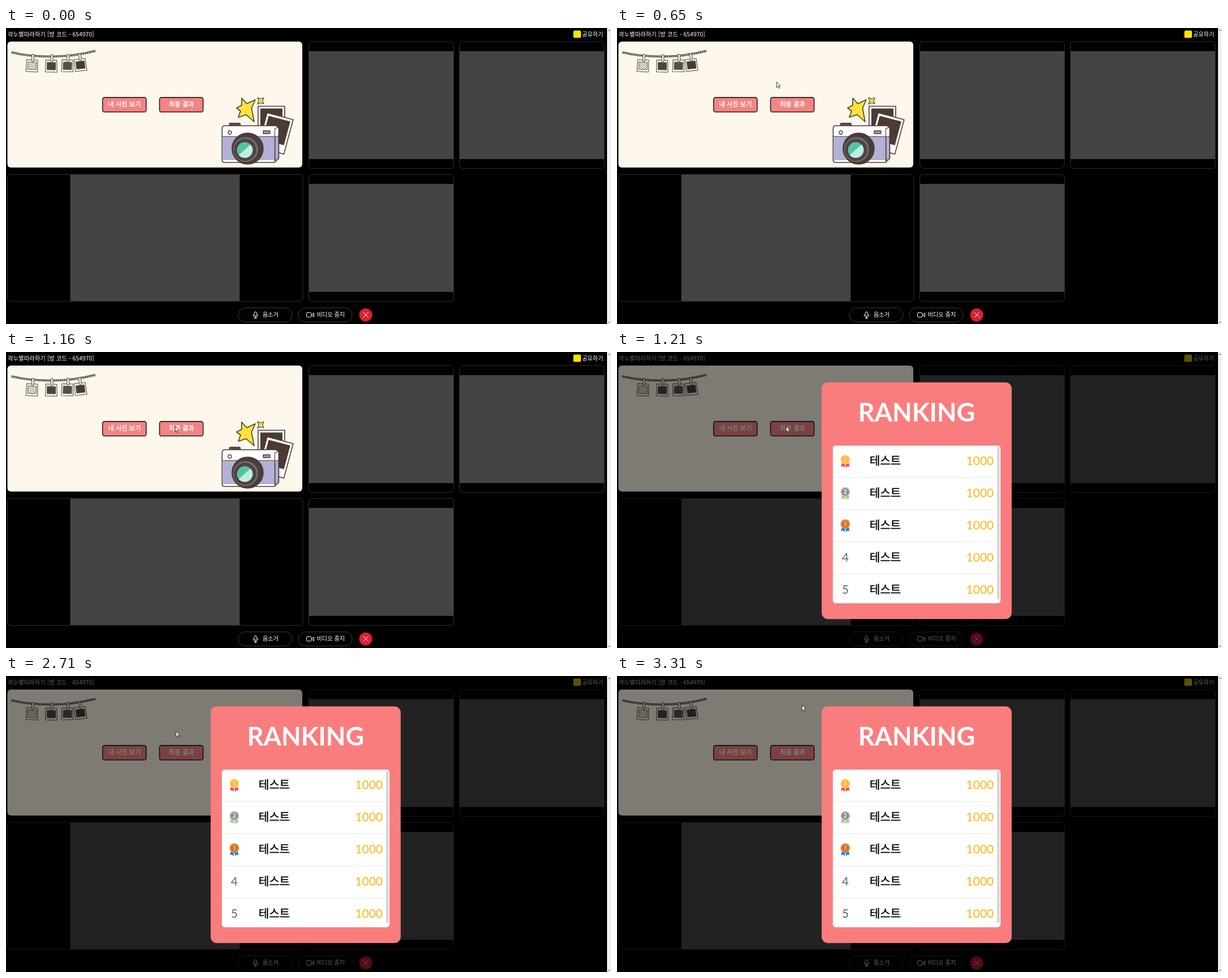
An HTML page for the animation above (3.76 s loop, 1068 by 524 pixels).

```html
<!DOCTYPE html>
<html lang="ko">
<head>
<meta charset="utf-8">
<title>Ranking</title>
<style>
  html, body { margin: 0; width: 100%; height: 100%; overflow: hidden; background: #000; }
  svg { display: block; width: 1068px; height: 524px; }
  text { font-family: "Noto Sans CJK KR", "Noto Sans CJK", "Noto Sans", sans-serif; white-space: pre; }
  .latin { font-family: Lato, sans-serif; }
  .mid { text-anchor: middle; }
  .end { text-anchor: end; }
  .semi { stroke-width: .35; }
  .tile { fill: none; stroke: #303030; }
  .video { fill: #444; }
  .ink { stroke: #4c3a35; stroke-width: 1.6; stroke-linejoin: round; }
  .icon { fill: none; stroke: #fff; stroke-linecap: round; }
</style>
</head>
<body>
<svg viewBox="0 0 1068 524">
  <defs>
    <pattern id="hatch" width="3" height="4" patternUnits="userSpaceOnUse" patternTransform="rotate(48)">
      <path d="M.6 0V4" stroke="#56524a" stroke-width=".8"/>
    </pattern>
    <clipPath id="glass"><circle cx="421.5" cy="216" r="14"/></clipPath>
  </defs>
  <rect width="1068" height="524"/>

  <text x="3" y="14.7" font-size="10.4" fill="#fff">곽누별따라하기 [방 코드 - 654970]</text>
  <rect x="1001.5" y="4.5" width="13.5" height="13" rx="2.5" fill="#fae100"/>
  <text x="1017" y="14.5" font-size="10.1" fill="#fff">공유하기</text>

  <rect x="2.5" y="24" width="520.5" height="223" rx="6" fill="#fdf8eb"/>
  <g id="garland"></g>
  <g id="buttons"></g>

  <g class="ink">
    <path d="M416 124L425 134 440 127 433.5 142 438 166 424 153.5 410 158 414 147 407 141.5 416 137Z" fill="#ffe23a"/>
    <path d="M444 123L449 125.5 455 123.5 453 129 455 134 449 132.5 444 135 446 129Z" fill="#ffe23a" stroke-width="1.1"/>
    <path d="M445 138.5H492V185H445Z" fill="#fff"/>
    <path d="M449 142.5H488V178H449Z" fill="#4c3a35" stroke="none"/>
    <g transform="translate(461 150) rotate(15)">
      <path d="M0 0H47.5V63H0Z" fill="#fff"/>
      <path d="M4 4.5H43.5V48H4Z" fill="#4c3a35" stroke="none"/>
    </g>
    <rect x="394.5" y="168.5" width="19" height="7" rx="2" fill="#5e4c48"/>
    <path d="M386 173H476Q481 174 481.5 179V231L474 238H386Q381.5 238 381.5 233V178Q381.5 173 386 173Z" fill="#fff"/>
    <path d="M382.2 192H474V234H382.2Z" fill="#b3b1d5" stroke="none"/>
    <path d="M475 193L481 191V229L475 235Z" fill="#b3b1d5" stroke-width="1"/>
    <path d="M382 192H474.5M474.5 178V237M474.5 179L480 175" fill="none" stroke-width="1.1"/>
    <circle cx="395" cy="185" r="3" fill="#fff" stroke-width="1.3"/>
    <rect x="454" y="182" width="12" height="5" fill="#a59a9b" stroke-width="1.3"/>
    <circle cx="426.5" cy="213.5" r="27.5" fill="#463e3f"/>
    <circle cx="423" cy="215" r="23" fill="#71686a"/>
    <circle cx="422" cy="215.7" r="18.5" fill="#514849"/>
    <circle cx="421.5" cy="216" r="14.7" fill="#55c1a4"/>
    <path d="M405 230L440 199V235H405Z" fill="#bdeee2" clip-path="url(#glass)" stroke="none"/>
  </g>

  <g id="tiles"></g>

  <g fill="#000" stroke="#3a3a3a">
    <rect x="410" y="495.5" width="95" height="25" rx="12.5"/>
    <rect x="516" y="495.5" width="95" height="25" rx="12.5"/>
  </g>
  <g class="icon">
    <rect x="438.3" y="502.5" width="4.4" height="7.5" rx="2.2"/>
    <path d="M436.3 507.5Q436.3 512 440.5 512T444.7 507.5M440.5 512V514M438.5 514H442.5"/>
    <rect x="530.5" y="503.8" width="8.5" height="8" rx="1.8"/>
    <path d="M541 506.5L543.5 504.5V511.5L541 509.5Z"/>
  </g>
  <text class="mid" x="467" y="511" font-size="10.2" fill="#fff">음소거</text>
  <text class="mid" x="573.3" y="511" font-size="10.2" fill="#fff">비디오 중지</text>
  <circle cx="635" cy="508" r="11.5" fill="#dc1f30"/>
  <path class="icon" d="M631 503.5L639.5 512M639.5 503.5L631 512"/>

  <g id="modal">
    <rect width="1061" height="524" opacity=".5"/>
    <path d="M0 0H1061V22H0ZM0 486H1061V524H0Z" opacity=".25"/>
    <rect x="361.3" y="53.7" width="335.4" height="419" rx="11" fill="#fa7d7d"/>
    <text class="mid latin" x="529" y="123.3" font-size="45" font-weight="700" fill="#fff">RANKING</text>
    <rect x="381" y="165.7" width="296" height="279" rx="5" fill="#fff"/>
    <g id="rows"></g>
    <rect x="671" y="168" width="4.5" height="269.5" rx="2.2" fill="#d5d5d8"/>
  </g>

  <rect x="1061" width="7" height="524" fill="#f1f1f1"/>
  <path d="M1062.8 5L1064.8 2.5 1066.8 5ZM1062.8 520L1064.8 522.5 1066.8 520Z" fill="#777"/>
  <path id="cursor" d="M0 0V9.8L2.3 7.7 3.9 11.2 5.5 10.5 3.9 7.1H6.8Z" fill="#fff" stroke="#111" stroke-width=".8"/>
</svg>
<script>
const LOOP = 3760, MODAL_AT = 1210;
const $ = id => document.getElementById(id);
const fill = (id, items, draw) => { $(id).innerHTML = items.map(draw).join(''); };

const rope = 'M9 43Q42 51 82 50.5T158 40.5';
const photos = [[46, 67, 3, 'url(#hatch)'], [80, 67.5, 1, '#4b4540'], [108.5, 67, 2, '#57504a'], [131.5, 65.5, -6, '#443b36']];
fill('garland', photos, ([x, y, turn, shade]) => `
  <g transform="translate(${x} ${y}) rotate(${turn})" stroke="#48443d" stroke-width="1">
    <path d="M-10 -10.5H9.5L10.3 10.5H-10.3Z" fill="#fdf8eb"/>
    <path d="M-7.5 -6.5H7.5V6.5H-7.5Z" fill="${shade}" stroke-width=".8"/>
  </g>`);
$('garland').insertAdjacentHTML('afterbegin', `
  <path d="${rope}" fill="none" stroke="#4f4b44" stroke-width="3.4"/>
  <path d="${rope}" fill="none" stroke="#e4dfd2" stroke-width="1.4" stroke-dasharray="2 1.7"/>`);
$('garland').insertAdjacentHTML('beforeend', photos.map(([x, y, turn]) =>
  `<rect x="-2" y="-20.5" width="4" height="12.5" rx="1.5" transform="translate(${x + 0.7} ${y}) rotate(${turn})"
    fill="#f1ecdf" stroke="#4f4b44"/>`).join(''));

fill('buttons', [[170.5, '내 사진 보기'], [271, '최종 결과']], ([x, label]) => `
  <rect x="${x}" y="123" width="77" height="25.7" rx="3.5" fill="#f48383" stroke="#000" stroke-width="1.3"/>
  <text class="mid semi" x="${x + 38.6}" y="138.8" font-size="11.2" fill="#fff" stroke="#fff">${label}</text>`);

// tile x, y, width, then the video box inside it
fill('tiles', [
  [534.5, 24, 255.5, 535, 41, 255, 191],
  [800.5, 24, 255.5, 801, 41, 255, 191],
  [2.5, 259.5, 521.5, 113.5, 259.5, 299, 224],
  [534.5, 259.5, 255.5, 535, 276, 255, 191]
], ([x, y, w, vx, vy, vw, vh]) => `
  <rect class="tile" x="${x}" y="${y}" width="${w}" height="224.5" rx="6"/>
  <rect class="video" x="${vx}" y="${vy}" width="${vw}" height="${vh}"/>`);

const medals = [['#fcd377', '#fdb93f', '#ffe4a0', '#f5414f'], ['#c6c6c6', '#8d8d8d', '#fff', '#98d67e'], ['#e99a4c', '#d4702c', '#f7b877', '#137df2']];
const medal = ([rim, face, digit, ribbon], n) => `
  <path d="M398 -1L395.5 10.5 399 9.5 401.5 12.5 403 4 404.5 12.5 407 9.5 410.5 10.5 408 -1Z" fill="${ribbon}"/>
  <circle cx="403" cy="-2" r="8.6" fill="${rim}"/>
  <circle cx="403" cy="-2" r="6.6" fill="${face}"/>
  <text class="mid" x="403" y="1.7" font-size="10" font-weight="700" fill="${digit}">${n}</text>`;
fill('rows', [1, 2, 3, 4, 5], n => `
  <g transform="translate(0 ${135.5 + 57 * n})">
    ${medals[n - 1] ? medal(medals[n - 1], n) : `<text class="mid latin" x="403" y="7.5" font-size="21" fill="#666">${n}</text>`}
    <text class="semi" x="446" y="7.2" font-size="20" stroke="#000">테스트</text>
    <text class="end latin" x="665" y="7.5" font-size="21" fill="#fdb515">1000</text>
    ${n < 5 ? '<path d="M381 29.5H670" stroke="#e6e6e8"/>' : ''}
  </g>`);

// pointer stops: time, x, y
const stops = [
  [450, 331, 12.5], [550, 301, 57], [650, 281.7, 95.5], [750, 289, 120], [850, 298.6, 131.5],
  [2510, 298.6, 131.5], [2610, 299, 122], [2710, 300, 98], [2810, 302.5, 75], [2910, 307, 59],
  [3010, 313.5, 55.5], [3110, 320, 53.5], [3310, 326.5, 51.8]
];
function pointerAt(t) {
  const i = stops.findIndex(stop => stop[0] > t);
  if (i < 0) return stops[stops.length - 1].slice(1);
  const a = stops[i - 1], b = stops[i], k = (t - a[0]) / (b[0] - a[0]);
  return [a[1] + (b[1] - a[1]) * k, a[2] + (b[2] - a[2]) * k];
}

function render(t) {
  const offset = t < 1160 ? 0 : 10;
  const tick = Math.floor((t - offset) / 50) * 50 + offset;
  const visible = tick >= stops[0][0];
  $('modal').style.display = t >= MODAL_AT ? '' : 'none';
  $('cursor').style.display = visible ? '' : 'none';
  if (visible) $('cursor').setAttribute('transform', `translate(${pointerAt(tick)})`);
}

const start = performance.now();
function loop() {
  render((performance.now() - start) % LOOP);
  requestAnimationFrame(loop);
}
loop();
</script>
</body>
</html>
```
